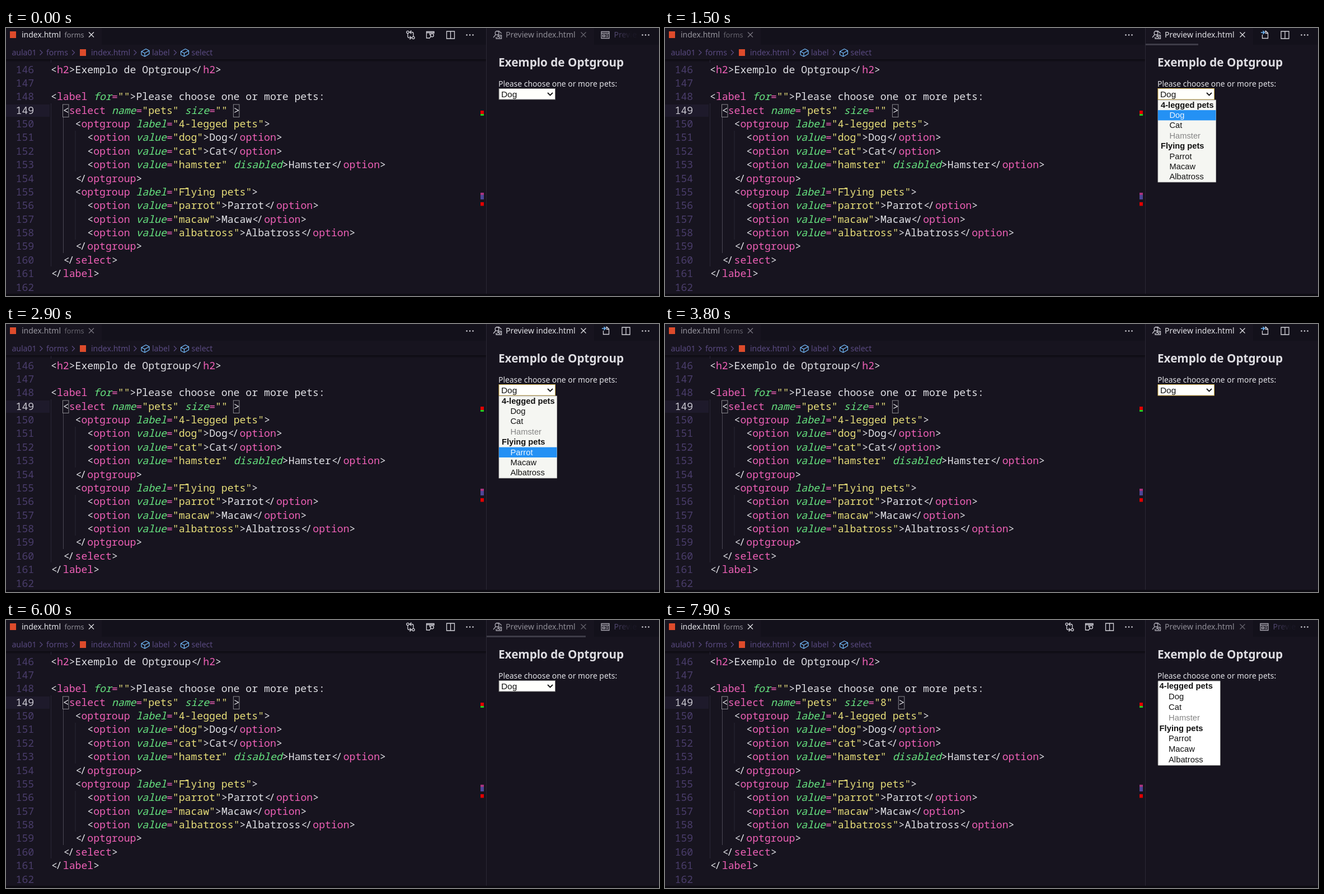
Write an HTML page that moves like this. It is 1167 px wide and 480 px high and loops after 8 s.

```html
<!DOCTYPE html>
<html lang="pt">
<head>
<meta charset="utf-8">
<title>Optgroup</title>
<style>
  html, body { margin: 0; width: 100%; height: 100%; overflow: hidden; background: #17141f; }
  svg { display: block; width: 1167px; height: 480px; }
  text { white-space: pre; font: 14px "Noto Sans", "Open Sans", sans-serif; }
  .code text { font: 18.15px "Noto Sans Mono", "DejaVu Sans Mono", monospace; fill: #e1e1e6; font-variant-ligatures: none; }
  .code .tag { fill: #ee60b6; }
  .code .attr { fill: #67e480; font-style: italic; }
  .code .str { fill: #e7de79; }
  .code .num { fill: #4a3d6b; }
  .code .now { fill: #c9c7d0; }
  .match { fill: none; stroke: #8b8a90; }
  .crumb { fill: #594a80; }
  .line { fill: none; stroke: #d4d3da; stroke-width: 1.3; }
  .solid { fill: #d4d3da; }
  .opt { font: 14.7px "Liberation Sans", Arial, sans-serif; fill: #111; }
  .head { font-weight: bold; }
  .off { fill: #858585; }
</style>
</head>
<body>
<svg viewBox="0 0 1167 480">
  <defs>
    <g id="dots" class="solid"><circle cx="-5.5" r="1.3"/><circle r="1.3"/><circle cx="5.5" r="1.3"/></g>
    <path id="split" class="line" d="M-7-6.5H7V6.5H-7ZM0-6.5V6.5"/>
    <path id="close" d="M-4.5-4.5L4.5 4.5M4.5-4.5L-4.5 4.5" fill="none" stroke-width="1.3"/>
    <path id="cube" d="M-7-2L1-6.5 7-3.5V2.5L-1 7-7 4ZM-7-2L-1 1 7-3.5M-1 1V7" fill="none" stroke="#75beff" stroke-width="1.2" stroke-linejoin="round"/>
    <path id="chev" d="M-2.5-4.5L2 0-2.5 4.5" fill="none" stroke="#594a80" stroke-width="1.2"/>
    <linearGradient id="fade"><stop offset=".1" stop-color="#51476e"/><stop offset="1" stop-color="#13111b"/></linearGradient>
    <linearGradient id="shade" x2="0" y2="1"><stop stop-color="#0c0a11"/><stop offset="1" stop-color="#0c0a11" stop-opacity="0"/></linearGradient>
  </defs>

  <rect width="1167" height="480" fill="#17141f"/>
  <rect x="171" width="687" height="30" fill="#13111b"/>
  <rect x="1051" width="116" height="30" fill="#13111b"/>
  <rect y="137" width="78" height="22" fill="#1e1a2b"/>
  <rect y="56" width="858" height="5" fill="url(#shade)"/>

  <g class="code" id="code">
    <path d="M80.5 57V62M80.5 135V427M124 184V257M124 306V379" stroke="#292637"/>
    <path d="M102.5 160V403" stroke="#4b4855"/>
  </g>
  <rect id="caret" x="386" y="136" width="2" height="24" fill="#e1e1e6"/>

  <rect x="848" y="148" width="6" height="6.5" fill="#e00000"/>
  <rect x="848" y="154" width="6" height="3" fill="#20d020"/>
  <rect x="848" y="295" width="6" height="4" fill="#a8337f"/>
  <rect x="848" y="299" width="6" height="8" fill="#4d4696"/>
  <rect x="848" y="312" width="6" height="6.5" fill="#e00000"/>

  <rect x="7" y="6" width="11" height="12" fill="#dd4b2b"/>
  <text id="leftName" x="28" y="17">index.html</text>
  <text id="leftDir" x="104.5" y="17" style="font-size:12.6px">forms</text>
  <use id="leftClose" href="#close" x="152.5" y="12"/>

  <g class="crumb">
    <text x="10.5" y="48.5">aula01</text>
    <text x="72" y="48.5">forms</text>
    <text x="152" y="48.5">index.html</text>
    <text x="261" y="48.5">label</text>
    <text x="331.5" y="48.5">select</text>
  </g>
  <use href="#chev" x="63" y="44"/><use href="#chev" x="120.5" y="44"/>
  <use href="#chev" x="231" y="44"/><use href="#chev" x="302.5" y="44"/>
  <rect x="132" y="38" width="11" height="12" fill="#dd4b2b"/>
  <use href="#cube" x="249" y="44"/><use href="#cube" x="319.5" y="44"/>
  <use href="#dots" x="829" y="12.5"/>

  <g id="leftTools">
    <g class="line">
      <circle cx="718" cy="7.5" r="2.1"/><circle cx="728" cy="17.5" r="2.1"/>
      <path d="M718 10V15Q718 17.5 720.500 17.500H724M721.500 14.500L724.500 17.500 721.500 20.500M728 15V10Q728 7.500 725.500 7.500H722M724.500 4.500L721.500 7.500 724.500 10.500"/>
      <path d="M756 18H751.500V6.500H765V10M751.500 8.500H765M757.500 8.500V13"/>
      <circle cx="761.500" cy="13" r="2.8"/><path d="M759.500 15L756 19"/>
    </g>
    <use href="#split" x="794.500" y="12.500"/>
  </g>

  <path d="M858.500 0V480" stroke="#2c2935"/>
  <g id="previewIcon" class="line">
    <path d="M876 5.500H881L885 9V10M875 12L871 17M878.500 13H885.500V19H876V16"/>
    <circle cx="877.500" cy="9" r="3.300"/>
    <path d="M878 16.500L880 14.500 882 17 884 15"/>
  </g>
  <text id="rightName" x="893" y="17">Preview index.html</text>
  <use id="rightClose" href="#close" x="1032" y="12"/>
  <use href="#dots" x="1143" y="12.500"/>
  <g id="nextTab">
    <path class="line" d="M1064 6.500H1078V18.500H1064ZM1064 9.500H1078M1066.500 12.500H1070.500V15.500H1066.500ZM1072.500 12.500H1076M1072.500 15.500H1076" style="stroke:#aaa8b2"/>
    <text x="1086.500" y="17" fill="url(#fade)">Previ</text><text x="1119.500" y="17" fill="#1b1826">e</text>
  </g>
  <g id="rightTools">
    <path class="line" d="M1067.500 12V18.500H1077.500V9L1074 5.500H1072M1073.500 5.500V9.500H1077.500"/>
    <path d="M1065 8H1071M1068.500 5L1071.500 8 1068.500 11" fill="none" stroke="#75beff" stroke-width="1.500"/>
    <use href="#split" x="1108" y="12.500"/>
  </g>
  <rect id="bar" x="859" y="28" height="3" fill="#46434f"/>

  <text x="880" y="69" fill="#deddE2" style="font-size:20.700px;font-weight:bold">Exemplo de Optgroup</text>
  <text x="880" y="105" fill="#e1e1e6" style="font-size:13.900px">Please choose one or more pets:</text>

  <g id="closed">
    <rect id="box" x="881" y="108.500" width="100.500" height="19.500" fill="#fffffc"/>
    <text class="opt" x="885" y="124" style="font-size:15.400px">Dog</text>
    <path d="M968 116L972.500 120.500 977 116" fill="none" stroke="#111" stroke-width="1.800"/>
  </g>
  <g id="menu">
    <rect x="881" y="129" width="103.500" height="147" fill="#f5f6f2" stroke="#c9c9c6" stroke-width=".8"/>
    <rect id="mark" x="881" width="103.500" height="18.300" fill="#2491f4"/>
  </g>
  <g id="list">
    <rect x="881" y="109" width="111.500" height="151.500" rx="1" fill="#fff" stroke="#767676"/>
  </g>
  <rect y="476" width="1167" height="4" fill="#0d0b12"/>
</svg>

<script>
const $ = id => document.getElementById(id);
const PITCH = 10.89, LEFT = 80, LINE = 24.38;

function add(parent, tag, attrs, text) {
  const node = document.createElementNS("http://www.w3.org/2000/svg", tag);
  for (const key in attrs) node.setAttribute(key, attrs[key]);
  if (text) node.textContent = text;
  return parent.appendChild(node);
}

// Code listing
const FIRST = 146;
const source = `<h2>Exemplo de Optgroup</h2>

<label for="">Please choose one or more pets:
  <select name="pets" size="" >
    <optgroup label="4-legged pets">
      <option value="dog">Dog</option>
      <option value="cat">Cat</option>
      <option value="hamster" disabled>Hamster</option>
    </optgroup>
    <optgroup label="Flying pets">
      <option value="parrot">Parrot</option>
      <option value="macaw">Macaw</option>
      <option value="albatross">Albatross</option>
    </optgroup>
  </select>
</label>
`.split("\n");
const TOKEN = /(<\/?)([a-z0-9]+)|(\s[a-z]+)(=?)|("[^"]*")|(>)([^<]*)/g;
const KINDS = ["", "tag", "attr", "tag", "str", "", ""];

function drawCode(parent, src, row) {
  const y = 80.5 + row * LINE;
  const put = (col, text, kind, dx = 0) =>
    add(parent, "text", { x: LEFT + col * PITCH + dx, y, class: kind }, text);
  for (const match of src.matchAll(TOKEN)) {
    let col = match.index;
    match.slice(1).forEach((text, i) => {
      if (!text) return;
      if (text === "</") {
        put(col, "<", "", 1);
        put(col + 1, "/", "", -2);
      } else put(col, text, KINDS[i]);
      col += text.length;
    });
  }
}

function drawMatch(parent, col) {
  add(parent, "rect", { class: "match", x: LEFT + col * PITCH - .3, y: 137, width: 10.5, height: 22.5 });
}

const code = $("code"), before = add(code, "g"), after = add(code, "g");
source.forEach((src, row) => {
  const current = row === 3;
  add(code, "text", { x: 17.5, y: 80.5 + row * LINE, class: current ? "now" : "num" }, String(FIRST + row));
  if (!current) return drawCode(code, src, row);
  const typed = src.replace('""', '"8"');
  [[before, src], [after, typed]].forEach(([group, line]) => {
    drawCode(group, line, row);
    drawMatch(group, line.indexOf("<"));
    drawMatch(group, line.indexOf(">"));
  });
});
add(code, "path", { d: "M313 287.800H325", stroke: "#e7de79", "stroke-width": 1.5 });

// Option rows
const names = ["4-legged pets", "Dog", "Cat", "Hamster", "Flying pets", "Parrot", "Macaw", "Albatross"];
const ROW = 18.4;

function drawOptions(parent, x, indent, y, pitch, size) {
  return names.map((name, i) => {
    const head = i % 4 === 0;
    return add(parent, "text", {
      x: head ? x : x + indent, y: y + i * pitch, style: `font-size:${size}px`,
      class: "opt" + (head ? " head" : name === "Hamster" ? " off" : "")
    }, name);
  });
}
const menuRows = drawOptions($("menu"), 886, 15.5, 142.6, ROW, 14.7);
drawOptions($("list"), 883.5, 16.5, 123.3, 18.8, 14.8);

// Each step changes only the listed values
const steps = [
  [0, { right: 0, edge: "#767676", row: 0, bar: 0, caret: 0, typed: 0, list: 0 }],
  [500, { edge: "#4c4c4c" }],
  [700, { right: 1, edge: "#d9b44a" }],
  [800, { row: 1 }],
  [900, { bar: 1 }],
  [1500, { bar: .85 }],
  [1800, { bar: .45, row: 2 }],
  [2000, { bar: .15, row: 5 }],
  [2100, { bar: 0 }],
  [2300, { row: 6 }],
  [2400, { row: 7 }],
  [2900, { row: 5 }],
  [3100, { row: 2 }],
  [3200, { row: 1 }],
  [3800, { row: 0 }],
  [5300, { right: 0, edge: "#767676" }],
  [5400, { caret: 1 }],
  [5500, { bar: 1 }],
  [5900, { caret: 0 }],
  [6000, { bar: .85 }],
  [6300, { bar: .45, caret: 1, typed: 1 }],
  [6500, { bar: .2 }],
  [6600, { list: 1 }],
  [6700, { bar: 0, caret: 0 }],
  [7200, { caret: 1 }],
  [7900, { caret: 0 }]
];
const DURATION = 8000;

const show = (node, on) => { node.style.display = on ? "" : "none"; };
const bright = "#e1e1e6", dim = "#8f8d96";

function render(time) {
  const s = {};
  for (const [at, change] of steps) if (at <= time) Object.assign(s, change);

  $("leftName").style.fill = s.right ? "#96949d" : bright;
  $("leftDir").style.fill = s.right ? "#66646e" : "#918f98";
  $("leftClose").style.stroke = s.right ? "#77757f" : bright;
  $("rightName").style.fill = s.right ? bright : dim;
  $("rightClose").style.stroke = s.right ? bright : "#65636d";
  $("previewIcon").style.stroke = s.right ? "#c8c7cf" : "#aaa8b2";
  show($("leftTools"), !s.right);
  show($("nextTab"), !s.right);
  show($("rightTools"), s.right);

  $("bar").setAttribute("width", s.right ? 94 : 177);
  $("bar").style.opacity = s.bar;

  show(before, !s.typed);
  show(after, s.typed);
  show($("caret"), s.caret);
  $("caret").setAttribute("x", s.typed ? 395.8 : 386);

  show($("closed"), !s.list);
  show($("list"), s.list);
  $("box").style.stroke = s.edge;
  show($("menu"), s.row);
  $("mark").setAttribute("y", 128.700 + s.row * ROW);
  menuRows.forEach((row, i) => { row.style.fill = i && i === s.row ? "#eef6ff" : ""; });
}

function tick() {
  render(performance.now() % DURATION);
  requestAnimationFrame(tick);
}
tick();
</script>
</body>
</html>
```
